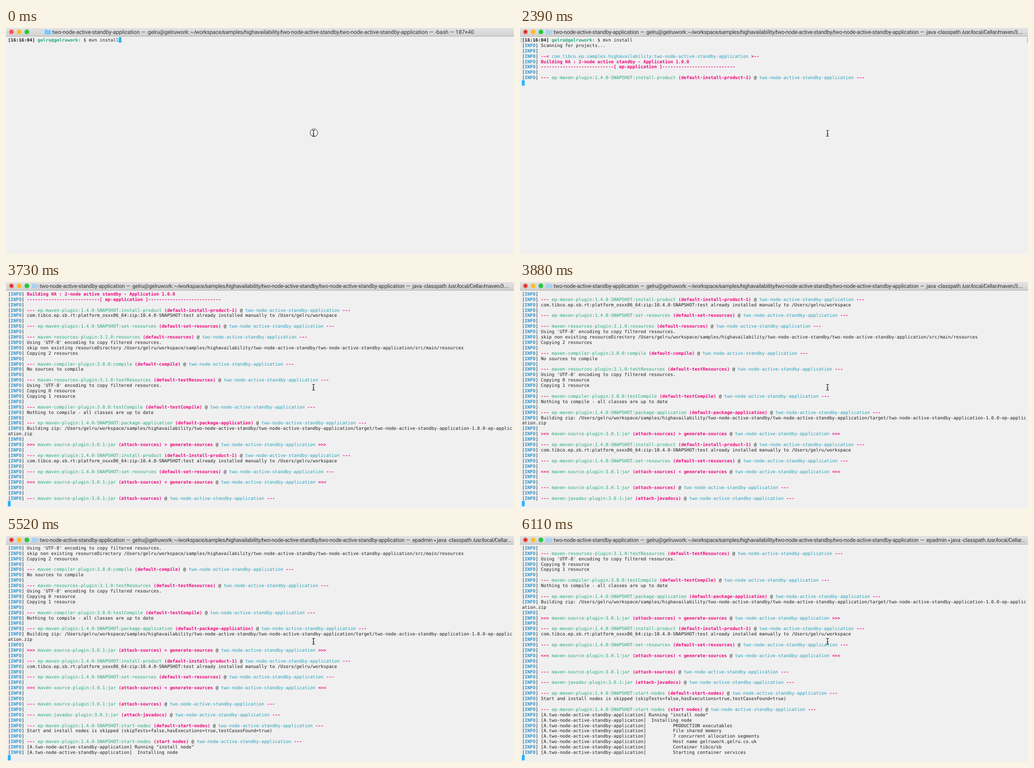
These frames come from a looping animation (1120x500 px, 8 s). An HTML page:

```html
<!DOCTYPE html>
<html lang="en">
<head>
<meta charset="utf-8">
<title>Terminal build</title>
<style>
  html, body { margin: 0; width: 100%; height: 100%; overflow: hidden; background: #f0f0f0; }
  svg { display: block; width: 100%; height: 100%; }
  text { white-space: pre; text-rendering: geometricPrecision; }
  #screen text { font: 9.886px "DejaVu Sans Mono", monospace; fill: #1c1c1c; }
  #title text { font: 12px Roboto, "DejaVu Sans", sans-serif; fill: #343434; }
  #title .arrow { font-size: 8px; }
  #screen .k { font-weight: bold; }
  #screen .i { font-weight: bold; fill: #2090cc; }
  #screen .m { font-weight: bold; fill: #f0047c; }
  #screen .p { font-weight: bold; fill: #20a878; }
  #screen .g { fill: #20a878; }
  #screen .c { fill: #22a0bc; }
</style>
</head>
<body>
<svg viewBox="0 0 1120 500" xmlns="http://www.w3.org/2000/svg">
  <defs>
    <linearGradient id="bar" x1="0" y1="0" x2="0" y2="1">
      <stop offset="0" stop-color="#e4e4e4"/>
      <stop offset="1" stop-color="#d1d1d1"/>
    </linearGradient>
  </defs>
  <rect width="1120" height="500" fill="#f0f0f0"/>
  <g id="screen">
    <g id="marks" fill="none" stroke="#9a9a9a">
      <path d="M4 22.5H2.5V31.5H4M1117 22.5H1118.5V31.5H1117"/>
    </g>
    <rect id="caret" width="6" height="11.9" fill="#1fb4fb"/>
    <g id="rows"></g>
  </g>
  <rect width="1120" height="18" fill="url(#bar)"/>
  <rect y="18" width="1120" height="1" fill="#b0b0b0"/>
  <circle cx="12" cy="8.5" r="5.2" fill="#fc5b57"/>
  <circle id="busy" cx="12" cy="8.5" r="1.8" fill="#6e0c08"/>
  <circle cx="29" cy="8.5" r="5.2" fill="#fdbc2e"/>
  <circle cx="46" cy="8.5" r="5.2" fill="#29c93f"/>
  <path id="folder" d="M0 4.5q0-1 1-1h4l1.4 1.3h6.6q1 0 1 1v7.2q0 1-1 1h-12q-1 0-1-1z"/>
  <g id="title"></g>
  <g id="pointer" fill="none" stroke="#141414">
    <circle id="ring" cx="679" cy="231.8" r="8.4" fill="#f6f6f6"/>
    <path id="beam" d="M674.8 226.5q3 0 3.2 1.8q.2-1.8 3.2-1.8M678 228v10M674.8 239.5q3 0 3.2-1.8q.2 1.8 3.2 1.8M676.3 234.3h3.4" stroke-width="1.2"/>
  </g>
</svg>
<script>
const LOOP = 8000, COL = 5.952, ROW = 11.9, LEFT = 4.4, TOP = 20.4, LAST_ROW = 39;
const USER = "gelru", HOST = "gelruwork";
const STANDBY = "two-node-active-standby", APP = STANDBY + "-application";
const SAMPLES = "workspace/samples/highavailability/" + STANDBY + "/";
const HOME = `/Users/${USER}/`;
const $ = id => document.getElementById(id);

const esc = s => s.replace(/&/g, "&amp;").replace(/</g, "&lt;").replace(/>/g, "&gt;");
const span = (kind, s) => `<tspan class="${kind}">${esc(s)}</tspan>`;
const info = (html = "") => `[${span("i", "INFO")}] ${html}`;
const say = s => info(esc(s));
const goal = (plugin, phase, open = "---", close = "---") =>
  info(span("m", open + " ") + span("g", plugin) + " " + span("m", phase) +
       " @ " + span("c", APP) + span("m", " " + close));
const ep = (name, phase) => goal("ep-maven-plugin:1.4.0-SNAPSHOT:" + name, `(${phase})`);
const mvn = (name, phase) => goal("maven-" + name, `(${phase})`);
const node = s => say(`[A.${APP}] ${s}`);
const detail = s => node(" ".repeat(9) + s);

const gap = info(), dashes = "-".repeat(27);
const utf = say("Using 'UTF-8' encoding to copy filtered resources.");
const product = [
  ep("install-product", "default-install-product-1"),
  say(`com.tibco.ep.sb.rt:platform_osxx86_64:zip:10.4.0-SNAPSHOT:test already installed manually to ${HOME}workspace`),
  gap,
  ep("set-resources", "default-set-resources"),
  gap
];
const sourceJar = "maven-source-plugin:3.0.1:jar";

const lines = [
  span("k", "[16:16:04] ") + span("p", `${USER}@${HOST}:`) + " $ mvn install",
  say("Scanning for projects..."),
  gap,
  info(span("m", "--< ") + span("c", "com.tibco.ep.samples.highavailability:" + APP) + span("m", " >--")),
  info(span("m", "Building HA : 2-node active standby - Application 1.0.0")),
  info(span("m", `${dashes}[ ep-application ]${dashes}`)),
  gap,
  ...product,
  mvn("resources-plugin:3.1.0:resources", "default-resources"),
  utf,
  say(`skip non existing resourceDirectory ${HOME}${SAMPLES}${APP}/src/main/resources`),
  say("Copying 2 resources"),
  gap,
  mvn("compiler-plugin:3.8.0:compile", "default-compile"),
  say("No sources to compile"),
  gap,
  mvn("resources-plugin:3.1.0:testResources", "default-testResources"),
  utf,
  say("Copying 0 resource"),
  say("Copying 1 resource"),
  gap,
  mvn("compiler-plugin:3.8.0:testCompile", "default-testCompile"),
  say("Nothing to compile - all classes are up to date"),
  gap,
  ep("package-application", "default-package-application"),
  say(`Building zip: ${HOME}${SAMPLES}${APP}/target/${APP}-1.0.0-ep-applic`),
  "ation.zip",
  gap,
  goal(sourceJar, "(attach-sources) > generate-sources", ">>>", ">>>"),
  gap,
  ...product,
  goal(sourceJar, "(attach-sources) < generate-sources", "<<<", "<<<"),
  gap,
  gap,
  goal(sourceJar, "(attach-sources)"),
  gap,
  mvn("javadoc-plugin:3.0.1:jar", "attach-javadocs"),
  gap,
  ep("start-nodes", "default-start-nodes"),
  say("Start and install nodes is skipped (skipTests=false,hasExecutions=true,testCasesFound=true)"),
  gap,
  ep("start-nodes", "start nodes"),
  node('Running "install node"'),
  node(" Installing node"),
  detail("PRODUCTION executables"),
  detail("File shared memory"),
  detail("7 concurrent allocation segments"),
  detail(`Host name ${HOST}.${USER}.co.uk`),
  detail("Container tibco/sb"),
  detail("Starting container services")
];

// [start time, lines printed so far]
const output = [
  [0, 1], [1190, 2], [1940, 6], [2390, 8], [3440, 18], [3590, 29],
  [3730, 43], [3880, 45], [4180, 50], [4320, 52], [5820, 57], [6110, 58]
];

// Title pieces: [x, letter spacing, text]
const idleTitle = [
  [102, 0, APP], [298.5, 0, "—"], [312.5, -.08, `${USER}@${HOST}:`],
  [406, -.1, "~/" + SAMPLES], [737, 0, APP], [933, .1, "— -bash — 187×40"]
];
const busyTitle = tail => [
  [74, -.14, APP], [265, -.2, "—"], [278.5, -.18, `${USER}@${HOST}:`],
  [370, -.27, "~/" + SAMPLES], [691, -.14, APP], [882, -.2, "—"], ...tail
];
const child = name => busyTitle([
  [896, -.3, name + " ◂"], [950, -.2, "java"], [974, -.3, "-classpath"],
  [1029, -.35, "/usr/local/Cellar..."]
]);
const titles = [
  [0, idleTitle],
  [290, busyTitle([[896, -.2, "java"], [919, -.3, "-classpath"], [974, -.33, "/usr/local/Cellar/maven/3...."]])],
  [4470, busyTitle([[896, -.2, "java ◂ java"], [951, -.3, "-classpath"], [1006, -.35, "/usr/local/Cellar/m..."]])],
  [4920, child("epadmin")],
  [5370, busyTitle([[896, -.2, "bash ◂ java"], [954, -.3, "-classpath"], [1009, -.35, "/usr/local/Cellar/m..."]])],
  [5520, child("epadmin")]
];

const drawTitle = pieces => pieces.map(([x, gap, s]) =>
  `<text x="${x}" y="13" letter-spacing="${gap}">` +
  s.replace(/\//g, `<tspan letter-spacing="${gap - 1.7}">/</tspan>`)
   .replace("◂", `<tspan class="arrow" dy="-1">◂</tspan><tspan dy="1"> </tspan>`)
   .replace("</tspan>  ", "</tspan> ") + "</text>").join("");

$("rows").innerHTML = lines.map((html, i) =>
  `<text x="${LEFT}" y="${(TOP + 9.5 + i * ROW).toFixed(2)}">${html}</text>`).join("");
const rows = [...$("rows").children];

const at = (steps, t) => steps.reduce((now, [start, value]) => t >= start ? value : now, null);
const show = (el, on) => el.setAttribute("visibility", on ? "visible" : "hidden");

let shownTitle;
function update(t) {
  const busy = t >= 290, count = at(output, t), first = Math.max(0, count - LAST_ROW);
  rows.forEach((row, i) => show(row, i >= first && i < count));
  $("rows").setAttribute("transform", `translate(0 ${-first * ROW})`);

  $("caret").setAttribute("x", busy ? 4.2 : LEFT + 41 * COL);
  $("caret").setAttribute("y", TOP + (busy ? count - first : 0) * ROW);
  show($("marks"), busy && first === 0);
  show($("busy"), busy);
  $("folder").setAttribute("transform", `translate(${busy ? 57 : 85} 0)`);
  $("folder").setAttribute("fill", busy ? "#a8d3ec" : "#72cbfa");
  show($("ring"), t < 150);
  $("beam").setAttribute("transform", t < 150 ? "translate(0 -.5)" : "");

  const title = at(titles, t);
  if (title !== shownTitle) {
    shownTitle = title;
    $("title").innerHTML = drawTitle(title);
  }
}

const begin = performance.now();
function tick() {
  update((performance.now() - begin) % LOOP);
  requestAnimationFrame(tick);
}
tick();
</script>
</body>
</html>
```
